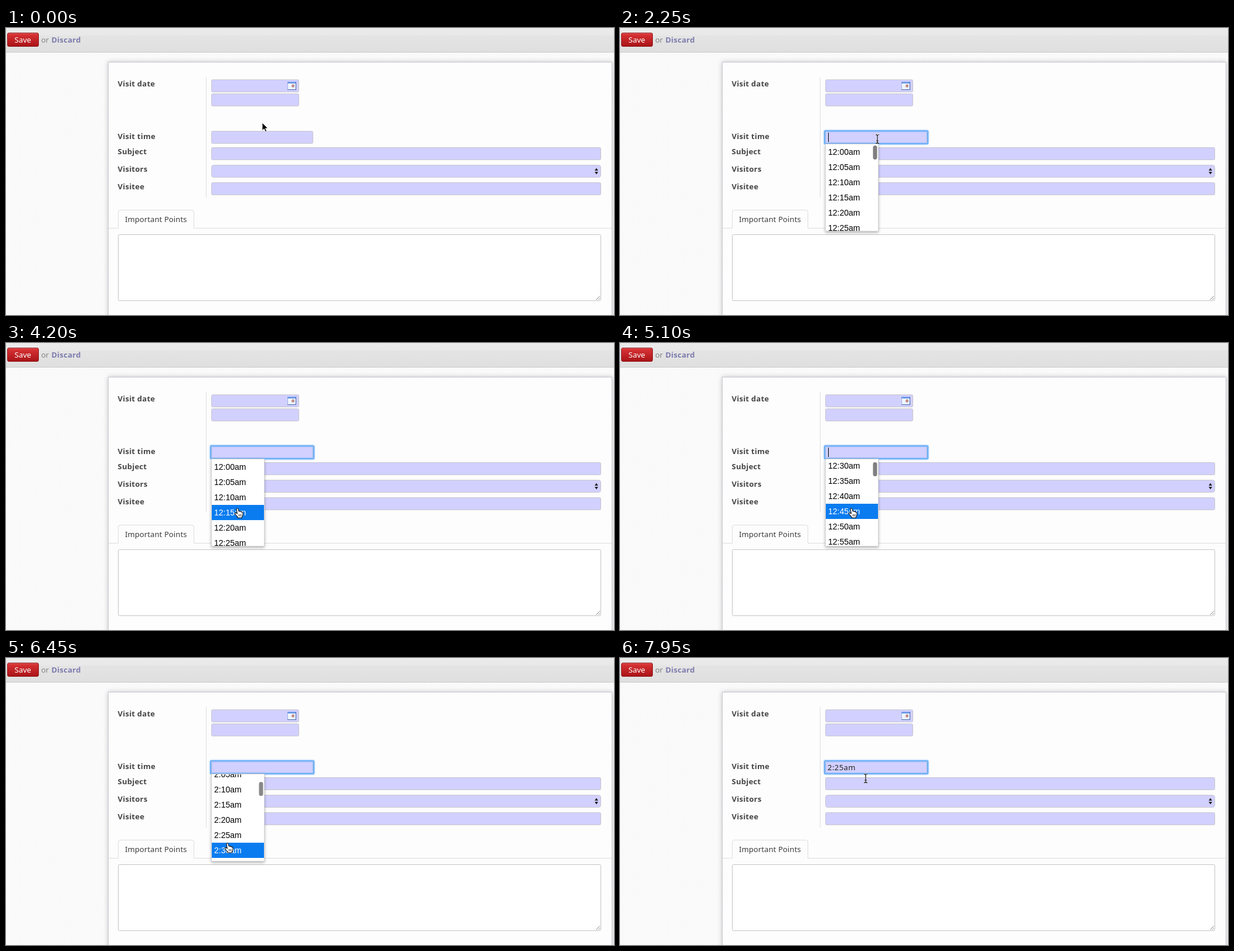
Write an HTML page that moves like this. It is 1037 px wide and 491 px high and loops after 8 s.

```html
<!DOCTYPE html>
<html lang="en">
<head>
<meta charset="utf-8">
<title>Visit form</title>
<style>
html, body { margin: 0; width: 100%; height: 100%; overflow: hidden; background: #fff; }
svg { display: block; width: 1037px; height: 491px; }
text { font: 13px "Noto Sans", "Open Sans", sans-serif; fill: #3c3c3c; white-space: pre; }
.label { font-weight: 700; letter-spacing: .25px; fill: #464646; }
.field { fill: #d2d0ff; stroke: #c8c8cc; }
.row { font: 14px "Liberation Sans", Arial, sans-serif; }
</style>
</head>
<body>
<svg viewBox="0 0 1037 491">
  <defs>
    <linearGradient id="bar" x2="0" y2="1">
      <stop offset="0" stop-color="#ebebeb"/><stop offset=".31" stop-color="#e8e8e8"/>
      <stop offset=".32" stop-color="#e4e4e4"/><stop offset="1" stop-color="#dfdfdf"/>
    </linearGradient>
    <linearGradient id="red" x2="0" y2="1">
      <stop offset="0" stop-color="#dc3638"/><stop offset="1" stop-color="#a91317"/>
    </linearGradient>
    <linearGradient id="sky" x2="1" y2="1">
      <stop offset="0" stop-color="#fff"/><stop offset="1" stop-color="#dfe9fa"/>
    </linearGradient>
    <pattern id="weave" width="4" height="4" patternUnits="userSpaceOnUse">
      <rect width="4" height="4" fill="#fdfdfd"/>
      <path d="M3 0h1v1h-1zM2 1h1v1h-1zM1 2h1v1h-1zM0 3h1v1h-1z" fill="#f0f0f0"/>
    </pattern>
    <filter id="soft" x="-10%" y="-10%" width="120%" height="120%"><feGaussianBlur stdDeviation="4.5"/></filter>
    <filter id="drop" x="-20%" y="-20%" width="140%" height="140%"><feGaussianBlur stdDeviation="2.5"/></filter>
    <clipPath id="view"><rect x="351" y="199" width="89" height="148"/></clipPath>
    <path id="stem" d="M-3 -7.5Q0 -7.5 0 -5.500Q0 -7.500 3 -7.500M0 -6V6M-3 7.500Q0 7.500 0 5.500Q0 7.500 3 7.500M-1.800 3H1.800"/>
  </defs>

  <rect width="1037" height="491" fill="url(#weave)"/>
  <rect x="174" y="58" width="860" height="460" opacity=".22" filter="url(#soft)"/>
  <rect width="1037" height="41" fill="url(#bar)"/>
  <rect y="41" width="1037" height="1" fill="#cacaca"/>
  <rect x="2.5" y="8.5" width="53" height="23" rx="2.5" fill="url(#red)" stroke="#8f1215"/>
  <path d="M4 9.5H54" stroke="#fff" opacity=".25"/>
  <text x="14.5" y="25" style="fill:#fff;font-weight:500">Save</text>
  <text x="60" y="25" style="fill:#858585">or</text>
  <text x="77.5" y="25" class="label" style="fill:#7c7bad">Discard</text>

  <rect x="174.5" y="58.5" width="859" height="460" fill="#fdfdfd" stroke="#c8c8d3"/>
  <path d="M341.5 84V290" stroke="#ddd"/>
  <g id="labels"></g>
  <g id="fields"></g>

  <g>
    <rect x="480.5" y="92.5" width="14" height="13" fill="url(#sky)" stroke="#9db6e4"/>
    <rect x="480" y="92" width="15" height="3" fill="#6d9be6"/>
    <path d="M494.5 92V106M480 105.5H495" stroke="#4468ad"/>
    <circle cx="489.5" cy="99" r="1.6" fill="#fff" stroke="#a5483c" stroke-width="1.2"/>
  </g>
  <path d="M1004 244L1007 239.5L1010 244ZM1004 246L1007 250.5L1010 246Z" fill="#222"/>

  <path d="M175 342.5H191.5V315q0-3.5 3.5-3.5H317q3.5 0 3.5 3.5V342.5H1033" fill="none" stroke="#ddd"/>
  <text x="203" y="332" letter-spacing=".1">Important Points</text>
  <rect x="191.5" y="353.5" width="823" height="113" rx="2" fill="#fff" stroke="#c4c4c4"/>
  <path d="M1006.5 465L1013 458.5M1010.5 465L1013 462.5" stroke="#777"/>

  <g id="focus" fill="none" stroke="#6aaef8">
    <rect x="349" y="176" width="176" height="22" rx="2" stroke-width="5" opacity=".35"/>
    <rect x="349" y="176" width="176" height="22" rx="1.5" stroke-width="2"/>
  </g>
  <text id="value" x="354" y="192" letter-spacing=".45" style="fill:#222">2:25am</text>
  <rect id="caret" y="179" width="1" height="16"/>

  <g id="menu">
    <rect x="350" y="200" width="91" height="150" opacity=".3" filter="url(#drop)"/>
    <rect x="350.5" y="198.5" width="90" height="149" fill="#fff" stroke="#d6d6d6"/>
    <g clip-path="url(#view)">
      <rect id="mark" x="351" width="89" height="26" fill="#0a7cf0"/>
      <g id="rows"></g>
    </g>
    <rect id="thumb" x="431.5" width="7" height="24" rx="3.5" fill="#7f7f7f"/>
  </g>

  <g id="cursor">
    <path id="arrow" d="M0 0V13.5L3.2 10.6L5.5 15.6L7.7 14.6L5.5 9.8H9.8Z" stroke="#fff" stroke-width=".9"/>
    <g id="beam" fill="none">
      <use href="#stem" stroke="#fff" stroke-width="2.6" opacity=".55"/>
      <use href="#stem" stroke="#111" stroke-width="1.2"/>
    </g>
    <g id="hand" stroke="#111" stroke-linejoin="round">
      <path d="M-2 1.200Q-2 -.3 -.5 -.3Q.8 -.3 1.100 1L2 5Q4 4 4.600 5.600Q6.600 4.900 7 6.600Q9 6.200 9 8.200V10.500Q8.800 13 7.500 14.500V16H0V14.500Q-2 12.500 -4.600 9Q-4.600 7 -2.800 7.500L-.6 9Z" fill="#fff" stroke-width="1.1"/>
      <path d="M2.2 10V13.5M4.2 10V13.5M6.2 10V13.5" stroke-width=".8"/>
    </g>
  </g>
</svg>
<script>
const LOOP = 8000, TICK = 150, ROW = 26, TOP = 199;
const OPEN = 2250, PICK = 7200;
const HOVER_LAG = 160;

const $ = id => document.getElementById(id);
const set = (id, k, v) => $(id).setAttribute(k, v);
const show = (id, on) => set(id, 'visibility', on ? 'inherit' : 'hidden');
const clamp = v => Math.max(0, Math.min(1, v));
const smooth = p => p * p * (3 - 2 * p);

function add(parent, tag, attrs, text = '') {
  const el = document.createElementNS('http://www.w3.org/2000/svg', tag);
  for (const k in attrs) el.setAttribute(k, attrs[k]);
  el.textContent = text;
  return $(parent).appendChild(el);
}

['Visit time', 'Subject', 'Visitors', 'Visitee'].forEach((name, i) =>
  add('labels', 'text', { x: 190.5, y: i ? 186 + i * 30 : 190, class: 'label' }, name));
add('labels', 'text', { x: 190.5, y: 100, class: 'label' }, 'Visit date');

const field = (y, w, rx = 2) => add('fields', 'rect',
  { x: 350.5, y: y + .5, width: w - 1, height: 21, rx, class: 'field' });
field(88, 150);
field(112, 150);
field(176, 174);
for (let i = 0; i < 3; i++) field(204 + i * 30, 665, i === 1 ? 4 : 2);

const rows = Array.from({ length: 7 }, () => add('rows', 'text', { x: 355, class: 'row' }));

// Eased moves of the pointer and flicks of the list.
const moves = [
  { from: 0, to: 900, end: [439, 190] },
  { from: 3150, to: 4200, end: [395, 283] },
  { from: 6000, to: 6450, end: [378, 317] },
  { from: 6450, to: 6750, end: [377, 306] },
  { from: 7650, to: 7950, end: [419, 206] }
];
const flicks = [
  { from: 4350, to: 4800, end: [158] },
  { from: 5100, to: 5980, end: [663] }
];

const follow = (steps, begin, t) => steps.reduce((at, { from, to, end }) => {
  const p = smooth(clamp((t - from) / (to - from)));
  return at.map((v, i) => v + (end[i] - v) * p);
}, begin).map(Math.round);

const pointer = t => follow(moves, [437, 162], t);
const scroll = t => follow(flicks, [0], t)[0];

function clock(i) {
  const h = Math.floor(i / 12);
  return `${h % 12 || 12}:${String(i * 5 % 60).padStart(2, '0')}${h < 12 ? 'am' : 'pm'}`;
}

// The hovered row is kept while the list rolls.
function hoveredRow(t) {
  const roll = flicks.find(f => t >= f.from && t < f.to + HOVER_LAG);
  const when = roll ? roll.from : t;
  return Math.floor((pointer(when)[1] - TOP + scroll(when)) / ROW);
}

function caretOn(t) {
  if (t < 3300) return t >= OPEN;
  return (t - (t < PICK ? 2700 : PICK)) % 1000 < 500;
}

function thumbOpacity(t) {
  const last = flicks.reduce((at, f) => t >= f.from ? Math.min(t, f.to) : at, OPEN);
  return clamp(1 - (t - last - 450) / 300);
}

function shapeAt(t, y) {
  if (y > TOP && t >= OPEN && t < PICK + TICK) return 'hand';
  const inField = [176, 204].some(top => y >= top && y <= top + 22);
  return inField ? 'beam' : 'arrow';
}

function draw(ms) {
  const t = Math.floor(ms / TICK) * TICK;
  const [x, y] = pointer(t), top = scroll(t);
  const picked = t >= PICK, open = t >= OPEN && !picked;

  show('focus', t >= OPEN);
  show('value', picked);
  show('caret', caretOn(t));
  set('caret', 'x', picked ? 403 : 355);

  show('menu', open);
  const hot = hoveredRow(t), first = Math.floor(top / ROW);
  show('mark', hot >= 0);
  set('mark', 'y', TOP + hot * ROW - top);
  rows.forEach((el, n) => {
    const i = first + n;
    el.textContent = clock(i);
    el.setAttribute('y', TOP + 18 + i * ROW - top);
    el.style.fill = i === hot ? '#fff' : '#000';
  });
  set('thumb', 'y', 201 + Math.round(top / 61));
  set('thumb', 'opacity', thumbOpacity(t));

  const shape = shapeAt(t, y);
  ['arrow', 'beam', 'hand'].forEach(id => show(id, id === shape));
  set('cursor', 'transform', `translate(${x} ${y})`);
}

let start;
function frame(now) {
  start ??= now;
  draw((now - start) % LOOP);
  requestAnimationFrame(frame);
}
draw(0);
requestAnimationFrame(frame);
</script>
</body>
</html>
```
